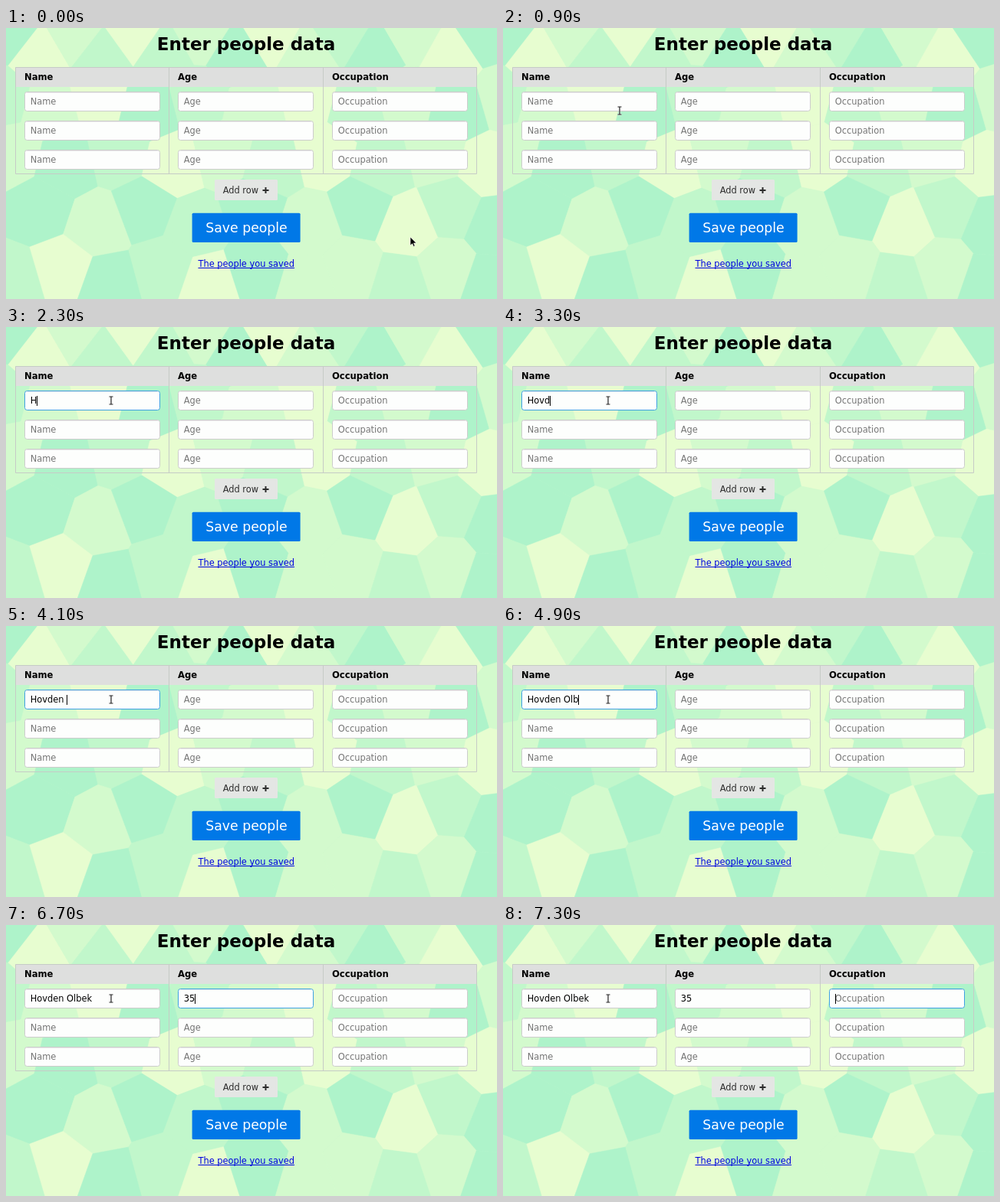
Recreate the animation shown at these times as an HTML page. Size 640 px wide and 354 px high, loop 8000 ms.

```html
<!DOCTYPE html>
<html lang="en">
<head>
<meta charset="utf-8">
<title>Enter people data</title>
<style>
  html, body { margin: 0; width: 100%; height: 100%; overflow: hidden; background: #cdf8cd; }
  svg { display: block; position: absolute; left: 0; top: 0; }
  text { font: 11.4px "DejaVu Sans", sans-serif; }
  .bold { font-weight: bold; }
  .head { font-size: 11.6px; }
  .title { font-size: 23px; }
  .save { font-size: 17.3px; fill: #fff; }
  .mid { text-anchor: middle; }
  .link { fill: #00d; }
  .grid { fill: none; stroke: #c6cbc6; }
  .field { fill: #fdfefd; stroke: #ccc; }
</style>
</head>
<body>
<svg id="stage" width="640" height="354" viewBox="0 0 640 354">
  <g id="mosaic"></g>
  <text class="bold title mid" x="313" y="29">Enter people data</text>
  <rect x="12" y="51" width="602" height="26" fill="#dedfde"/>
  <path class="grid" d="M12.5 51.5H613.5V190.5H12.5ZM212.5 51V191M413.5 51V191"/>
  <g id="table"></g>
  <rect x="272" y="198" width="82" height="27" rx="1.5" fill="#e4e6e4"/>
  <text x="282.7" y="216" fill="#2c2c2c">Add row</text>
  <path d="M334.5 212H342.5M338.5 208V216" stroke="#2c2c2c" stroke-width="2"/>
  <rect x="242.6" y="241.7" width="141" height="38.3" rx="1.5" fill="#0078e7"/>
  <text class="save mid" x="313.5" y="267">Save people</text>
  <text class="link mid" x="313.2" y="312">The people you saved</text>
  <path d="M250.5 313.5H376" stroke="#00d"/>
  <path id="caret" stroke="#000"/>
  <path id="arrow" d="M0 0V11L2.6 8.7L4.3 12.4L6 11.6L4.4 8H7.8Z" fill="#000" stroke="#fff" stroke-width=".6"/>
  <g id="beam" fill="none">
    <path d="M-2.5 -5H2.5M0 -5V5M-2.5 5H2.5" stroke="#fff" stroke-width="2.6" opacity=".7"/>
    <path d="M-2.5 -5H2.5M0 -5V5M-2.5 5H2.5" stroke="#222" stroke-width="1.2"/>
  </g>
</svg>
<script>
const LOOP = 8000;
const $ = id => document.getElementById(id);

function add(parent, tag, attrs, label = "") {
  const el = document.createElementNS("http://www.w3.org/2000/svg", tag);
  for (const key in attrs) el.setAttribute(key, attrs[key]);
  el.textContent = label;
  parent.appendChild(el);
  return el;
}

// Mosaic: zigzag rows of cell centres, one shade digit per cell
const SHADES = ["#aef3ca", "#c1f7cb", "#d3facd", "#e7fdd0"];
const ROWS = [
  { y: 22, zig: -14, shades: "032131203210230", xs: [6, 42, 90, 126, 165, 206, 255, 300, 346, 394, 436, 482, 530, 580, 622] },
  { y: 98, zig: -8, shades: "12301231202", xs: [-6, 58, 120, 186, 250, 324, 395, 456, 520, 592, 648] },
  { y: 172, zig: -8, shades: "2013213123", xs: [8, 76, 148, 216, 284, 346, 416, 490, 560, 628] },
  { y: 247, zig: -12, shades: "0201020310", xs: [46, 118, 182, 246, 322, 396, 464, 524, 580, 638] },
  { y: 324, zig: 10, shades: "13013022120", xs: [8, 76, 132, 206, 264, 326, 394, 450, 514, 574, 632] }
];

// Keep the part of a polygon that is nearer to a than to b
function nearer(poly, a, b) {
  const nx = b.x - a.x, ny = b.y - a.y;
  const c = (nx * (a.x + b.x) + ny * (a.y + b.y)) / 2;
  const out = [];
  poly.forEach((p, i) => {
    const q = poly[(i + 1) % poly.length];
    const dp = nx * p[0] + ny * p[1] - c;
    const dq = nx * q[0] + ny * q[1] - c;
    if (dp <= 0) out.push(p);
    if (dp * dq < 0) {
      const k = dp / (dp - dq);
      out.push([p[0] + k * (q[0] - p[0]), p[1] + k * (q[1] - p[1])]);
    }
  });
  return out;
}

function buildMosaic() {
  const cells = ROWS.flatMap(({ y, zig, shades, xs }) =>
    xs.map((x, i) => ({ x, y: y + (i % 2 ? -zig : zig), shade: shades[i] })));
  for (const a of cells) {
    let poly = [[a.x - 90, a.y - 90], [a.x + 90, a.y - 90], [a.x + 90, a.y + 90], [a.x - 90, a.y + 90]];
    for (const b of cells) if (b !== a) poly = nearer(poly, a, b);
    const fill = SHADES[a.shade];
    add($("mosaic"), "polygon", {
      points: poly.map(p => p.map(v => v.toFixed(1)).join()).join(" "),
      fill, stroke: fill, "stroke-width": .5
    });
  }
}

const HEADS = ["Name", "Age", "Occupation"];
const LEFT = [24.5, 224.5, 425.5];
const active = [];

function buildTable() {
  const table = $("table");
  HEADS.forEach((head, c) => {
    const x = LEFT[c];
    add(table, "text", { x: x - .5, y: 68, class: "bold head" }, head);
    [83.5, 121.5, 159.5].forEach((y, r) => {
      const box = add(table, "rect", { x, y, width: 176, height: 25, rx: 3, class: "field" });
      add(table, "path", { d: `M${x + 2} ${y + 1}h172`, stroke: "#e8e8e8" });
      const text = add(table, "text", { x: x + 7.2, y: y + 16.5, fill: "#757575" }, head);
      if (r === 0) active.push({ box, text, x: x + 7.2, head });
    });
  });
}

// Typing: time of each key
const ENTRIES = [
  { value: "Hovden Olbek", keys: [2300, 2400, 2600, 3300, 3500, 3700, 4100, 4300, 4500, 4900, 5000, 5300] },
  { value: "35", keys: [6400, 6700] },
  { value: "", keys: [] }
];
const FOCUS = [1600, 5700, 7100, LOOP + 1000];

const clamp = v => Math.max(0, Math.min(1, v));
const ramp = (t, start, steps) => clamp((t - start + 100) / (steps * 100));
const ease = p => p * p * (3 - 2 * p);
const mix = (a, b, p) => a + (b - a) * p;

function drawFields(t) {
  let caret = "";
  active.forEach((f, i) => {
    const { value, keys } = ENTRIES[i];
    const count = keys.filter(k => k <= t).length;
    f.text.textContent = count ? value.slice(0, count).replace(" ", "\u00a0") : f.head;
    f.text.setAttribute("fill", count ? "#000" : "#757575");

    const glow = ramp(t, FOCUS[i], 3) - ramp(t, FOCUS[i + 1], 3);
    const [r, g, b] = [62, 160, 226].map(v => Math.round(mix(204, v, glow)));
    f.box.style.stroke = `rgb(${r},${g},${b})`;

    if (t >= FOCUS[i] && t < FOCUS[i + 1]) {
      const w = count ? f.text.getComputedTextLength() : 0;
      caret = `M${Math.floor(f.x + w + .4) + .5} 90V103`;
    }
  });
  if (t >= 3100 && t < 3300) caret = "";
  $("caret").setAttribute("d", caret);
}

function drawPointer(t) {
  const go = ease(ramp(t, 500, 5)), settle = ease(ramp(t, 1200, 4));
  const x = mix(mix(527, 152, go), 137, settle);
  const y = mix(mix(273, 108, go), 96, settle);
  const typing = t >= 900;
  const shift = `translate(${x} ${y})`;
  $("arrow").setAttribute("transform", shift);
  $("beam").setAttribute("transform", shift);
  $("arrow").style.display = typing ? "none" : "";
  $("beam").style.display = typing ? "" : "none";
}

function draw(now) {
  const t = Math.floor((now % LOOP) / 100) * 100;
  drawFields(t);
  drawPointer(t);
}

buildMosaic();
buildTable();
draw(0);
const begin = performance.now();
function frame() {
  draw(performance.now() - begin);
  requestAnimationFrame(frame);
}
requestAnimationFrame(frame);
</script>
</body>
</html>
```
